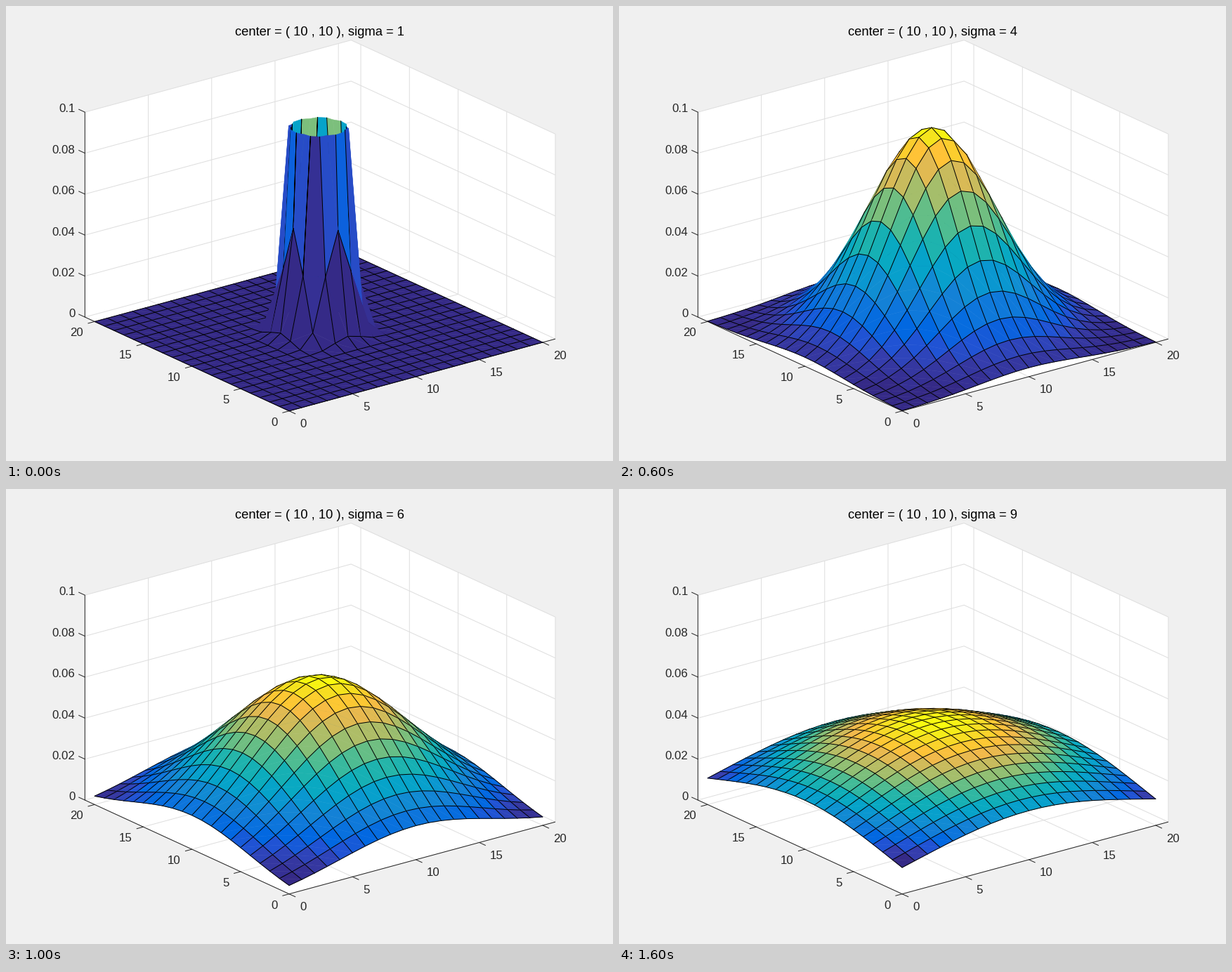
Recreate the animation shown at these times as a matplotlib script. Size 864 px wide and 648 px high, loop 1.8 s.

```python
import math

import matplotlib.pyplot as plt
from matplotlib.animation import FuncAnimation
from matplotlib.collections import PolyCollection
from matplotlib.colors import LinearSegmentedColormap

W, H = 864, 648
SPAN, N, CAP = 21, 20, 0.1
INK, GRID = "#262626", "#dedede"
FONT = "Liberation Sans"
CLEAR, BLACK = (0, 0, 0, 0), (0, 0, 0, 1)

PARULA = LinearSegmentedColormap.from_list("parula", [
    "#352a87", "#353dad", "#2053d4", "#0268e1", "#0d75dc", "#1481d6",
    "#108ed2", "#079ccf", "#06a7c6", "#0faeb9", "#25b5a9", "#42bb98",
    "#65be86", "#87bf77", "#a5be6b", "#c0bc60", "#d9ba56", "#f1b94a",
    "#ffc337", "#fad32a", "#f5e41d", "#f9fb0e"], N=64)

# Orthographic view stretched to fill the axes rectangle
AZ, EL = math.radians(37.5), math.radians(30)
CA, SA = math.cos(AZ), math.sin(AZ)
LEFT, BOTTOM = 0.13 * W, 0.89 * H
SX = 0.775 * W / (CA + SA)
SY = 0.815 * H / ((CA + SA) * math.sin(EL) + math.cos(EL))


def project(p):
    x, y, z = p[0] / SPAN, p[1] / SPAN, p[2] / CAP
    return (LEFT + SX * (SA + x * CA - y * SA),
            BOTTOM - SY * ((x * SA + y * CA) * math.sin(EL) + z * math.cos(EL)))


def clip(pts):
    """Keep the part of a ring of points that lies below the z limit."""
    out = []
    for a, b in zip(pts, pts[1:] + pts[:1]):
        if a[2] <= CAP:
            out.append(a)
        if (a[2] <= CAP) != (b[2] <= CAP):
            t = (CAP - a[2]) / (b[2] - a[2])
            out.append(tuple(u + t * (v - u) for u, v in zip(a, b)))
    return out


def gauss(x, y, sigma):
    r2 = (x - 10) ** 2 + (y - 10) ** 2
    return math.exp(-r2 / (2 * sigma ** 2)) / (sigma * math.sqrt(2 * math.pi))


def surface(sigma):
    """Faces and grid edges, ordered from back to front."""
    pts = [[(x, y, gauss(x, y, sigma)) for y in range(N + 1)]
           for x in range(N + 1)]
    heights = [p[2] for row in pts for p in row]
    low, high = min(heights), max(heights)
    verts, faces, edges, widths = [], [], [], []

    def face(ring, color):
        ring = clip(ring)
        if ring:
            verts.append([project(p) for p in ring + ring[:1]])
            faces.append(color)
            edges.append(color)
            widths.append(0.5)

    def edge(a, b):
        line = clip([a, b])
        if line:
            verts.append([project(p) for p in line])
            faces.append(CLEAR)
            edges.append(BLACK)
            widths.append(1.0)

    for i in reversed(range(N)):
        for j in reversed(range(N)):
            near, right = pts[i][j], pts[i + 1][j]
            left, far = pts[i][j + 1], pts[i + 1][j + 1]
            color = PARULA((near[2] - low) / (high - low))
            face([right, far, left], color)
            edge(right, far)
            edge(far, left)
            face([near, right, left], color)
            if j == 0:
                edge(near, right)
            if i == 0:
                edge(near, left)
    return verts, faces, edges, widths


fig = plt.figure(figsize=(W / 72, H / 72), dpi=72, facecolor="#f0f0f0")
ax = fig.add_axes([0, 0, 1, 1])
ax.set_xlim(0, W)
ax.set_ylim(H, 0)
ax.axis("off")


def line(*pts, color=GRID, z=2):
    xs, ys = zip(*map(project, pts))
    ax.plot(xs, ys, color=color, lw=1, zorder=z, solid_capstyle="butt")


def tick(p, toward, text, dx, dy, ha):
    x, y = project(p)
    qx, qy = project(toward)
    k = 9.5 / math.hypot(qx - x, qy - y)
    ax.plot([x, x + k * (qx - x)], [y, y + k * (qy - y)],
            color=INK, lw=1, zorder=3)
    ax.text(x + dx, y + dy, text, ha=ha, va="baseline", color=INK,
            family=FONT, size=16.8)


S = SPAN
box = [(0, 0, 0), (S, 0, 0), (S, 0, CAP), (S, S, CAP), (0, S, CAP), (0, S, 0)]
ax.fill(*zip(*map(project, box)), color="white", lw=0, zorder=1)

for v in range(0, N + 1, 5):
    line((v, 0, 0), (v, S, 0), (v, S, CAP))
    line((0, v, 0), (S, v, 0), (S, v, CAP))
    tick((v, 0, 0), (v, -1, 0), str(v), 15, 23.5, "left")
    tick((0, v, 0), (-1, v, 0), str(v), -16, 21, "right")
for k in range(6):
    z = k * CAP / 5
    line((0, S, z), (S, S, z), (S, 0, z))
    tick((0, S, z), (0, S + 1, z), f"{z:.2g}", -14, 0.3, "right")

line((0, S, CAP), (0, S, 0), (0, 0, 0), (S, 0, 0), color=INK, z=3)

mesh = PolyCollection([], closed=False, capstyle="round", joinstyle="round",
                      zorder=4)
ax.add_collection(mesh, autolim=False)
title = ax.text(326, 41.7, "", ha="left", va="baseline", color="black",
                family=FONT, size=18.4)


def update(i):
    sigma = i + 1
    verts, faces, edges, widths = surface(sigma)
    mesh.set_verts(verts, closed=False)
    mesh.set_facecolor(faces)
    mesh.set_edgecolor(edges)
    mesh.set_linewidth(widths)
    title.set_text(f"center = ( 10 , 10 ), sigma = {sigma}")
    return mesh, title


anim = FuncAnimation(fig, update, frames=9, interval=200, repeat=True,
                     repeat_delay=0, blit=False)
plt.show()
```
